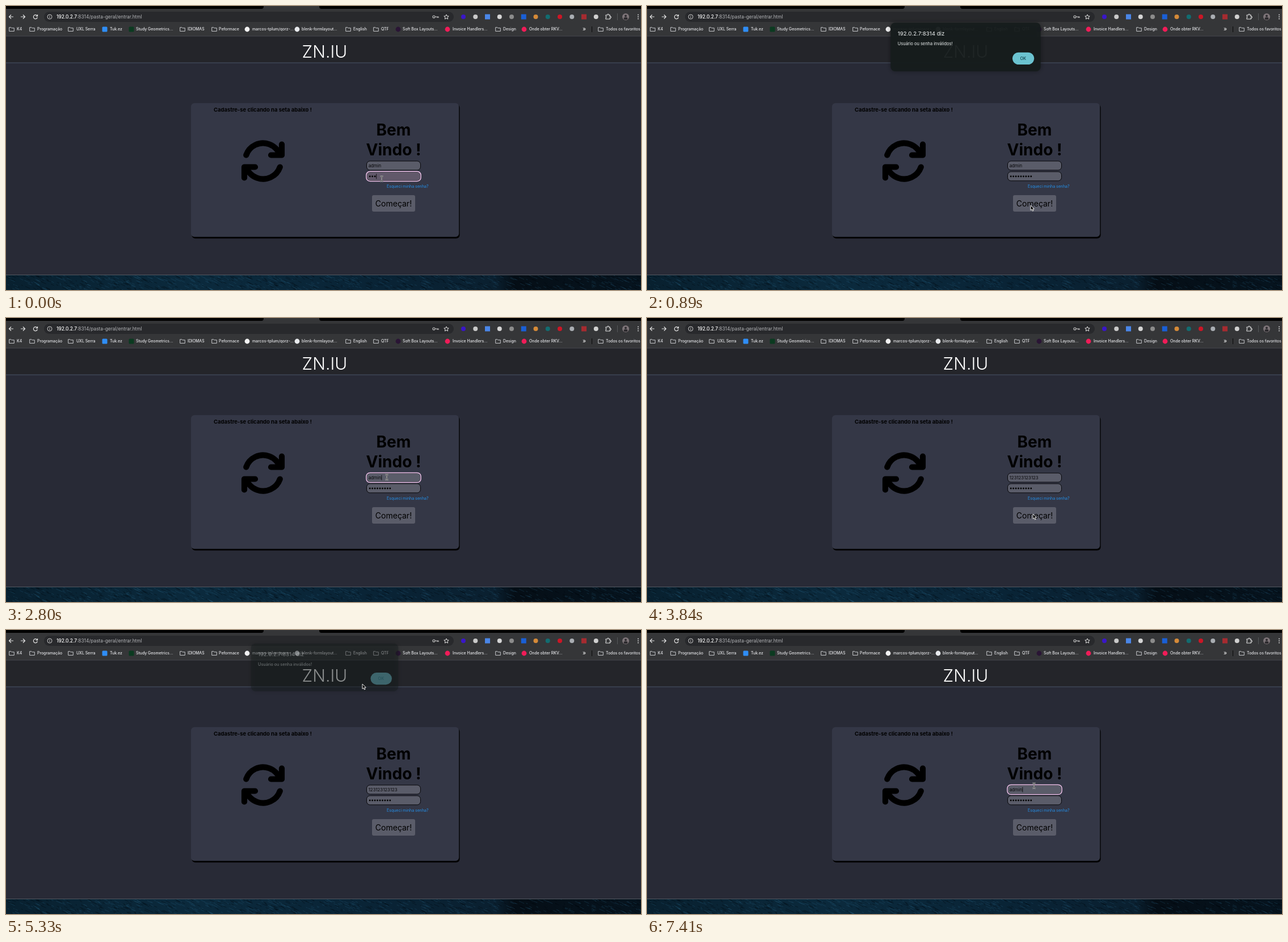
Animation of 1119x500 px, one loop 8 s. Source, as an HTML page with a canvas:

```html
<!DOCTYPE html>
<html lang="pt-BR">
<head>
<meta charset="utf-8">
<title>Login</title>
<style>
html, body { margin: 0; width: 100%; height: 100%; overflow: hidden; background: #282a36 }
canvas { display: block }
</style>
</head>
<body>
<canvas id="stage" width="1119" height="500"></canvas>
<script>
const c = document.getElementById('stage').getContext('2d');
const LOOP = 8000, STEP = 148;
const HOST = '192.0.2.7', PORT = ':8314';

// [step, values...]
const POINTER = [[0, 662, 304], [3, 663, 305], [5, 676, 351], [6, 676, 351], [8, 678, 262],
  [13, 654, 105], [14, 656, 98], [15, 664, 180], [16, 669, 264], [17, 670, 274], [19, 671, 280],
  [22, 673, 282], [24, 682, 318], [25, 680, 345], [27, 680, 345], [29, 678, 333], [32, 668, 210],
  [34, 655, 98], [35, 650, 97], [36, 628, 95], [37, 640, 120], [40, 690, 268], [42, 682, 274]];
const DIALOG = [[0, 0], [5, 0], [6, .93], [7, 1], [14, 1], [15, .4], [16, 0],
  [26, 0], [27, .93], [28, 1], [35, 1], [36, .4], [37, 0]];

function track(keys, n) {
  const i = keys.findIndex(k => k[0] > n);
  if (i < 0) return keys[keys.length - 1].slice(1);
  const a = keys[i - 1], b = keys[i], f = (n - a[0]) / (b[0] - a[0]);
  return a.slice(1).map((v, j) => v + (b[j + 1] - v) * f);
}

function rect(x, y, w, h, fill) {
  c.fillStyle = fill;
  c.fillRect(x, y, w, h);
}
function round(x, y, w, h, r, fill, stroke, lw = 1) {
  c.beginPath();
  c.roundRect(x, y, w, h, r);
  if (fill) { c.fillStyle = fill; c.fill(); }
  if (stroke) { c.strokeStyle = stroke; c.lineWidth = lw; c.stroke(); }
}
function dot(x, y, r, fill) {
  c.beginPath();
  c.arc(x, y, r, 0, 7);
  c.fillStyle = fill;
  c.fill();
}
function path(d, x, y, stroke, lw, fill) {
  const p = new Path2D(d);
  c.save();
  c.translate(x, y);
  if (fill) { c.fillStyle = fill; c.fill(p); }
  if (stroke) { c.strokeStyle = stroke; c.lineWidth = lw; c.stroke(p); }
  c.restore();
}
function text(s, x, y, size, color, weight = 400, align = 'left') {
  c.font = `${weight} ${size}px Inter, sans-serif`;
  c.textAlign = align;
  c.fillStyle = color;
  c.fillText(s, x, y);
  return c.measureText(s).width;
}

function toolbar() {
  const ink = '#e3e3e3', grey = '#c7c7c7';
  rect(0, 0, 1119, 53, '#353638');
  round(-10, -10, 464, 15, 4, '#000');
  round(552, -10, 580, 15, 4, '#000');
  round(67, 10, 722, 18, 9, '#28292c');
  path('M4 0H-3M0 -3.5L-3.5 0L0 3.5', 9, 19, ink, 1.2);
  path('M-4 0H3M0 -3.5L3.5 0L0 3.5', 30, 19, ink, 1.2);
  path('M3 -1.5A3.5 3.5 0 1 0 3.3 1M3.5 -4V-1H.5', 52, 19, ink, 1.2);
  path('M4 0A4 4 0 1 1 -4 0A4 4 0 1 1 4 0M0 -.5V2.2M0 -2.3V-1.3', 77, 19, grey, 1);
  const w = text(HOST, 89, 22, 8.3, '#fff', 500);
  text(PORT + '/pasta-geral/entrar.html', 89 + w, 22, 8.3, '#b4b5b8');
  path('M-1 0A2 2 0 1 1 -5 0A2 2 0 1 1 -1 0H5V2M3 0V2', 757, 19, grey, 1.1);
  path('M0 -4L1.2 -1.3L4.2 -1L2 1L2.6 4L0 2.4L-2.6 4L-2 1L-4.2 -1L-1.2 -1.3Z', 776, 19, ink, 1);

  const extensions = ['#3a16c8', '#c9c9c9', '#4a86e8', '#d5d5d5', '#8b8b8b', '#1a5fd6', '#d58a38',
    '#126c70', '#cc1626', '#a9adb2', '#a52b30', '#d0d0d0'];
  extensions.forEach((color, i) => {
    const x = 806 + i * 21.25;
    if ([2, 5, 10].includes(i)) rect(x - 4.5, 14.5, 9, 9, color);
    else dot(x, 19, 4, color);
  });
  path('M-4 -2.5H-1.3A1.4 1.4 0 1 1 1.4 -2.5H3.2V0A1.4 1.4 0 1 1 3.2 2.5V4.5H-4V2A1.4 1.4 0 0 0 -4 -.6Z', 1061, 18.5, ink, 1.1);
  rect(1077, 13, 1, 12, '#55575a');
  dot(1092, 19, 6, '#7d7478');
  dot(1092, 17.5, 2, '#2c2a2e');
  round(1088.5, 20, 7, 4, 2, '#2c2a2e');
  for (const y of [15.5, 19, 22.5]) dot(1114, y, .9, ink);
}

function bookmarks() {
  // [icon x, label x, label, icon colour or none for a folder, square?]
  const items = [[10, 19, 'K4'], [46, 55, 'Programação'], [114, 124, 'UXL Serra'],
    [174, 183, 'Tuk.ez', '#2f8df5', 1], [221, 229, 'Study Geometrics...', '#0b3a20', 1],
    [311, 320, 'IDIOMAS'], [367, 375, 'Peformace'], [425, 434, 'marcos-tplum/qorz-...', '#f2f2f2'],
    [513, 521, 'blenk-formlayout...', '#e8eaed'], [603, 612, 'English'], [652, 661, 'QTF'],
    [691, 699, 'Soft Box Layouts...', '#2a1535'], [778, 787, 'Invoice Handlers...', '#f01c58'],
    [867, 876, 'Design'], [913, 922, 'Onde obter RKV...', '#f01c58'], [1048, 1057, 'Todos os favoritos']];
  for (const [x, tx, label, color, square] of items) {
    if (!color) path('M-4.3 -3.3H-1L0 -2.2H4.3V3.4H-4.3Z', x, 41, '#c7c9cc', 1);
    else if (square) round(x - 4.5, 36.5, 9, 9, 1.5, color);
    else dot(x, 41, 4.4, color);
    text(label, tx, 43.3, 6.9, '#e6e7ea', 500);
  }
  text('»', 1019, 44, 10, '#e3e3e3', 500, 'center');
  rect(1032, 36, 1, 10, '#090909');
}

function wallpaper() {
  let seed = 9;
  const rnd = () => (seed = seed * 16807 % 2147483647) / 2147483647;
  const g = c.createLinearGradient(0, 0, 1119, 0);
  [[0, '#08202f'], [.3, '#0b2a3d'], [.6, '#092335'], [.77, '#0a2030'], [.8, '#050e16'], [1, '#06141f']]
    .forEach(s => g.addColorStop(...s));
  rect(0, 474, 1119, 26, g);
  c.save();
  c.beginPath();
  c.rect(0, 474, 1119, 26);
  c.clip();
  c.lineWidth = 1;
  for (let i = 0; i < 900; i++) {
    const x = rnd() * 1119, y = 472 + rnd() * 28, l = 2 + rnd() * 8;
    c.strokeStyle = i % 2 ? 'rgba(40,100,132,.3)' : 'rgba(0,5,10,.4)';
    c.beginPath();
    c.moveTo(x, y);
    c.lineTo(x + l, y + l * .45);
    c.stroke();
  }
  c.restore();
}

function refreshIcon() {
  c.save();
  c.translate(453, 273);
  c.lineWidth = 10.2;
  c.lineCap = c.lineJoin = 'round';
  c.strokeStyle = '#000';
  for (let i = 0; i < 2; i++) {
    c.beginPath();
    c.arc(0, 0, 31.6, Math.PI * 1.108, Math.PI * 1.75);
    c.lineTo(33, -10.5);
    c.moveTo(33, -29.5);
    c.lineTo(33, -10.5);
    c.lineTo(14, -10.5);
    c.stroke();
    c.rotate(Math.PI);
  }
  c.restore();
}

function field(y, focused, fill) {
  round(635.5, y + .5, 95, 16, 6, fill, '#07070a');
  if (focused) round(634.9, y - .1, 96.2, 17.2, 6.6, null, '#efc4ec', 1.5);
}

function page(n) {
  rect(0, 53, 1119, 421, '#282a36');
  rect(0, 53, 1119, 47, '#24252a');
  rect(0, 52.5, 1119, 1, '#47494e');
  rect(0, 99.5, 1119, 1, '#4b5568');
  rect(0, 473, 1119, 1, '#525760');
  text('ZN.IU', 561.5, 90.5, 30, '#fff', 300, 'center');

  round(327.5, 173, 472, 236.3, 6, '#000');
  round(326, 171, 472.2, 235.6, 6, '#343746');
  text('Cadastre-se clicando na seta abaixo !', 366, 186.2, 9.45, '#000', 700);
  refreshIcon();
  text('Bem', 683, 228.3, 28.1, '#000', 700, 'center');
  text('Vindo !', 683, 263.2, 28.1, '#000', 700, 'center');

  const onPass = n < 4, onUser = n >= 18 && n < 26 || n >= 41;
  let user = 'admin';
  if (n >= 46) user = user.slice(0, Math.floor((n - 46) * 1.25));
  else if (n >= 20) user = '123'.repeat(Math.min(4, n - 19));
  field(272.5, onUser, '#5a5c69');
  const w = text(user, 638.7, 283.6, 7.8, '#08080a');
  if (onUser) rect(639 + w, 276.5, .8, 9, '#000');

  const count = Math.min(9, 3 + 2 * n);
  field(291.3, onPass, onPass ? '#61586a' : '#5a5c69');
  for (let i = 0; i < count; i++) dot(641.2 + i * 4.45, 300, 1.45, '#000');
  if (onPass) rect(639 + count * 4.45, 295.5, .8, 9, '#000');

  text('Esqueci minha senha?', 671, 319.6, 7, '#2490ea');
  if (n === 24) rect(671, 320.8, 74, .7, '#2490ea');
  round(645, 333, 76, 29, 3, '#5a5c69');
  text('Começar!', 683, 353, 14, '#000', 400, 'center');
}

function dialog(show) {
  if (!show) return;
  const away = 1 - show, scale = 1 - away * .035;
  c.save();
  c.globalAlpha = show;
  c.translate(561.5, 73 - away * 12);
  c.scale(scale, scale);
  c.translate(-561, -73);
  c.shadowColor = 'rgba(0,0,0,.4)';
  c.shadowBlur = 8;
  round(428.5, 30, 265, 86, 8, '#161c1d');
  c.shadowColor = 'transparent';
  text(HOST + PORT + ' diz', 441, 52.6, 9.6, '#e2e5e5', 500);
  text('Usuário ou senha inválidos!', 441, 70.2, 7.4, '#dde1e1', 500);
  round(643.7, 82.5, 38.3, 21.5, 10.75, '#72d0de');
  text('OK', 662.5, 95.9, 7.4, '#0b3a43', 500, 'center');
  c.restore();
}

function pointer(x, y) {
  const overField = x > 635 && x < 731 && y > 271 && y < 309;
  if (overField) {
    const beam = 'M-2.5 -4.5Q0 -4.5 0 -3Q0 -4.5 2.5 -4.5M0 -3V3M-2.5 4.5Q0 4.5 0 3Q0 4.5 2.5 4.5';
    path(beam, x, y, '#d8d8d8', 1.8);
    path(beam, x, y, '#222', .8);
  } else {
    path('M0 0V8.6L2 6.8L3.4 10L5 9.3L3.6 6.2H6.3Z', x, y, '#f0f0f0', 1, '#000');
  }
}

let drawn = -1;
function frame(now) {
  const n = Math.min(50, Math.floor((now % LOOP + 20) / STEP));
  if (n !== drawn) {
    drawn = n;
    toolbar();
    bookmarks();
    page(n);
    wallpaper();
    dialog(track(DIALOG, n)[0]);
    pointer(...track(POINTER, n));
  }
  requestAnimationFrame(frame);
}
frame(performance.now());
</script>
</body>
</html>
```
